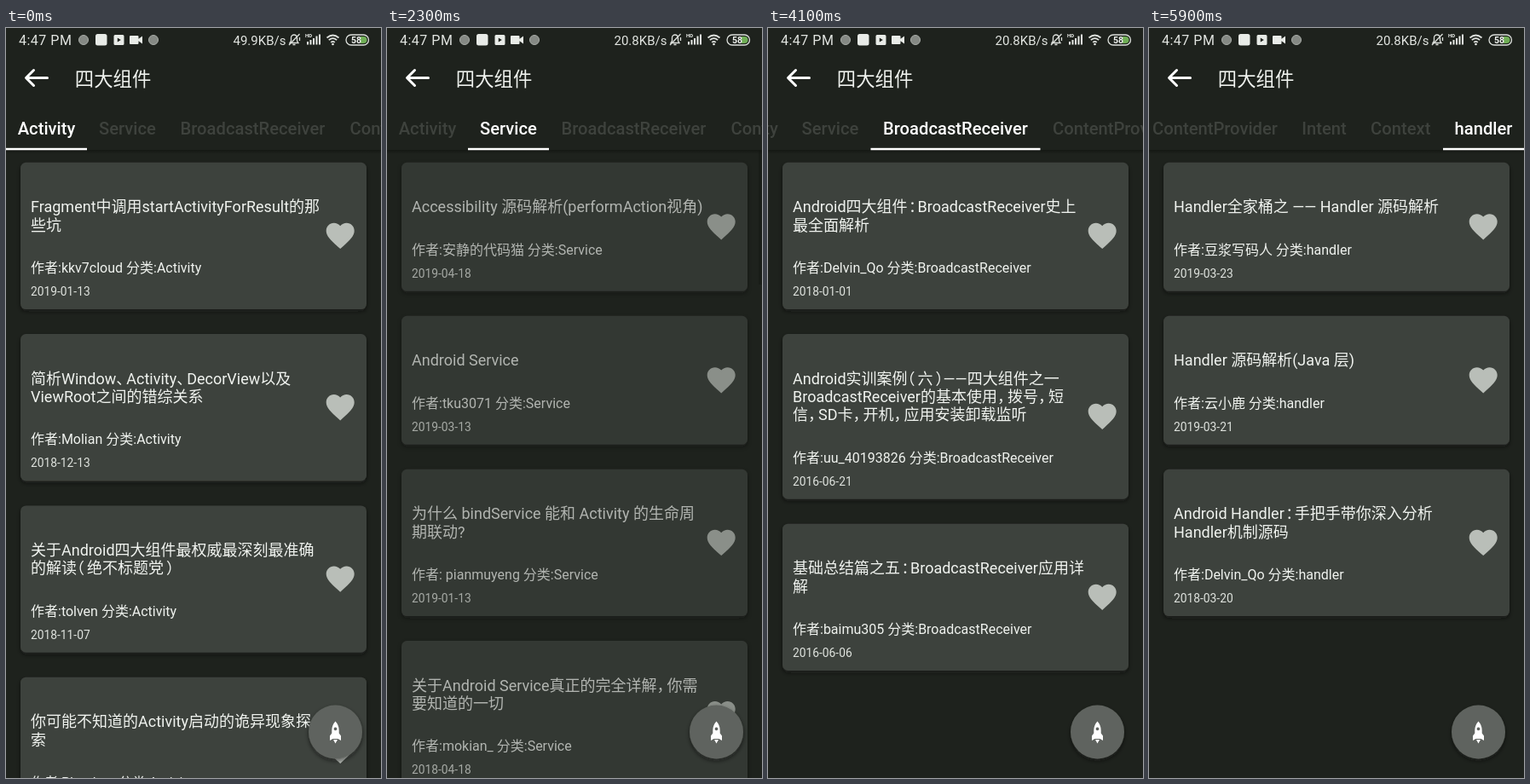
An HTML page for the animation above (6 s loop, 440x880 px).

```html
<!DOCTYPE html>
<html lang="zh-CN">
<head>
<meta charset="utf-8">
<title>四大组件</title>
<style>
html, body { margin: 0; width: 100%; height: 100%; overflow: hidden; background: #1e221d; }
svg { display: block; width: 100vw; height: 100vh; }
text { font-family: Roboto, "Noto Sans CJK SC", "Noto Sans CJK", sans-serif; fill: #f0f3ef; white-space: pre; }
.tab { font-size: 20.2px; font-weight: 500; text-anchor: middle; }
.title { font-size: 18px; }
.author { font-size: 16px; }
.date { font-size: 13.8px; fill: #dfe3de; }
.status { font-size: 15px; fill: #e2e5e1; }
</style>
</head>
<body>
<svg viewBox="0 0 440 880">
  <defs>
    <clipPath id="body"><rect y="144" width="440" height="736"/></clipPath>
    <filter id="shade" x="-10%" y="-10%" width="120%" height="125%">
      <feDropShadow dx="0" dy="2.5" stdDeviation="2.5" flood-color="#0c0f0b" flood-opacity=".6"/>
    </filter>
    <linearGradient id="edge" x2="0" y2="1">
      <stop stop-color="#0e110d" stop-opacity=".6"/>
      <stop offset="1" stop-color="#0e110d" stop-opacity="0"/>
    </linearGradient>
    <path id="heart" fill="#b9beb8" transform="scale(1.65) translate(-12 -12.17)"
      d="M12 21.35l-1.45-1.32C5.4 15.36 2 12.28 2 8.5 2 5.42 4.42 3 7.5 3c1.74 0 3.41.81 4.5 2.09C13.09 3.81 14.76 3 16.5 3 19.58 3 22 5.42 22 8.5c0 3.78-3.4 6.86-8.55 11.54z"/>
  </defs>
  <rect width="440" height="880" fill="#1e221d"/>
  <g id="pages" clip-path="url(#body)"></g>
  <rect y="143" width="440" height="5" fill="url(#edge)"/>

  <g id="tabs"></g>

  <path d="M48.500 58.500H24M32.500 49.500l-9 9 9 9" fill="none" stroke="#fff" stroke-width="3" stroke-linecap="round" stroke-linejoin="round"/>
  <text x="80.800" y="67.500" font-size="22.400">四大组件</text>

  <g id="status" fill="#e8ebe7">
    <text class="status" x="15" y="20" style="font-size:16px;letter-spacing:.5px">4:47 PM</text>
    <circle cx="91" cy="14" r="5.500" fill="#858984" stroke="#a9ada8"/>
    <rect x="105" y="7" width="13.500" height="13.500" rx="2.500"/>
    <path d="M128 8h9q1.500 0 1.500 1.500v9q0 1.500-1.500 1.500h-9q-1.500 0-1.500-1.500v-9q0-1.500 1.500-1.500zM130.800 11.500v5l4-2.500z" fill-rule="evenodd"/>
    <path d="M146 9h8.500q1 0 1 1v2.700l4.500-3.200v9l-4.500-3.200V18q0 1-1 1H146q-1 0-1-1v-8q0-1 1-1z"/>
    <circle cx="173" cy="14" r="5.500" fill="#858984" stroke="#a9ada8"/>
    <text class="status" id="speed" x="266.500" y="19.500"></text>
    <g fill="none" stroke="#dde0dc" stroke-width="1.300">
      <path d="M333 17.500h10l-1.500-2.500v-3.500a3.500 3.500 0 0 0-7 0V15zM336.500 19.500h3M332 20l12.500-13M344.500 11v4"/>
      <path d="M376.500 11.500q7-6 14 0M378.800 14.200q4.700-4 9.400 0M381.200 16.800q2.300-2 4.600 0" stroke-width="1.700"/>
      <rect x="399" y="8" width="26.500" height="12" rx="6"/>
    </g>
    <circle cx="383.500" cy="19" r="1.300"/>
    <text x="351" y="11" style="font-size:6px;font-weight:700">HD</text>
    <path d="M353 16h2v3.500h-2zM356.500 14h2v5.500h-2zM360 12h2v7.500h-2zM363.500 9.500h2v10h-2zM367 7.500h2v12h-2z"/>
    <path d="M416 10h3.500a4 4 0 0 1 0 8H416z" fill="#6fae55"/>
    <text x="411" y="17.800" text-anchor="middle" style="font-size:10.5px;font-weight:700">58</text>
  </g>

  <g filter="url(#shade)"><circle cx="386.500" cy="826" r="31.500" fill="#5f635e"/></g>
  <path fill="#fff" fill-rule="evenodd" d="M386.500 813.500q4.200 4.500 4.200 10.500v3.500l2.300 3v5.500l-3.500-2h-6l-3.500 2v-5.500l2.300-3v-3.500q0-6 4.200-10.500zM386.500 820.500a1.900 1.900 0 1 0 .01 0zM384 835h5l-2.500 4.500z"/>
</svg>
<script>
const LOOP = 6000, W = 440, LAG = 14, FLING = 4250, TAP = 5260;
const NS = 'http://www.w3.org/2000/svg';
const $ = id => document.getElementById(id);

function add(parent, tag, attrs = {}, text) {
  const el = document.createElementNS(NS, tag);
  for (const k in attrs) el.setAttribute(k, attrs[k]);
  if (text) el.textContent = text;
  parent.append(el);
  return el;
}

// Full-width punctuation is set two thirds of an em wide; this is each mark's shift.
const marks = { '、': 0, '，': 0, '：': 1.5, '（': -9, '）': 3 };

function addTitle(parent, y, str) {
  const el = add(parent, 'text', { class: 'title', x: 29, y });
  for (const part of str.split(/([、，：（）])/)) {
    if (!part) continue;
    const dx = marks[part];
    add(el, 'tspan', dx === undefined ? {} : { dx, style: `letter-spacing:${-6 - dx}px` }, part);
  }
}

// Card: title (lines split by |), author, date
const lists = {
  Activity: [
    ['Fragment中调用startActivityForResult的那|些坑', 'kkv7cloud', '2019-01-13'],
    ['简析Window、Activity、DecorView以及|ViewRoot之间的错综关系', 'Molian', '2018-12-13'],
    ['关于Android四大组件最权威最深刻最准确|的解读（绝不标题党）', 'tolven', '2018-11-07'],
    ['你可能不知道的Activity启动的诡异现象探|索', 'Plundeer', '2018-10-16']
  ],
  Service: [
    ['Accessibility 源码解析(performAction视角)', '安静的代码猫', '2019-04-18'],
    ['Android Service', 'tku3071', '2019-03-13'],
    ['为什么 bindService 能和 Activity 的生命周|期联动?', ' pianmuyeng', '2019-01-13'],
    ['关于Android Service真正的完全详解，你需|要知道的一切', 'mokian_', '2018-04-18']
  ],
  BroadcastReceiver: [
    ['Android四大组件：BroadcastReceiver史上|最全面解析', 'Delvin_Qo', '2018-01-01'],
    ['Android实训案例（六）——四大组件之一|BroadcastReceiver的基本使用，拨号，短|信，SD卡，开机，应用安装卸载监听', 'uu_40193826', '2016-06-21'],
    ['基础总结篇之五：BroadcastReceiver应用详|解', 'baimu305', '2016-06-06']
  ],
  ContentProvider: [], Intent: [], Context: [],
  handler: [
    ['Handler全家桶之 —— Handler 源码解析', '豆浆写码人', '2019-03-23'],
    ['Handler 源码解析(Java 层)', '云小鹿', '2019-03-21'],
    ['Android Handler：手把手带你深入分析|Handler机制源码', 'Delvin_Qo', '2018-03-20']
  ]
};
const names = Object.keys(lists);
const edges = [0, 95, 190, 389, 565, 645, 744.5, 839.5];
const maxScroll = edges[7] - W;
const fadeStart = { Service: 2090, BroadcastReceiver: 3650, handler: 5540 };

function addCard(parent, y, kind, [title, author, date]) {
  const lines = title.split('|');
  const h = 151 + 21.3 * (lines.length - 1);
  add(parent, 'rect', { x: 17, y, width: 406, height: h, rx: 6.5, fill: '#3e423d', filter: 'url(#shade)' });
  lines.forEach((s, i) => addTitle(parent, y + 58.5 + 21.3 * i, s));
  const foot = y + h - 43;
  add(parent, 'text', { class: 'author', x: 29, y: foot }, `作者:${author} 分类:${kind}`);
  add(parent, 'text', { class: 'date', x: 29, y: foot + 27 }, date);
  add(add(parent, 'g', { transform: `translate(392.2 ${y + h / 2})` }), 'use', { href: '#heart' });
  return y + h + 29;
}

const pages = names.map((kind, i) => {
  const root = add($('pages'), 'g');
  const cards = add(root, 'g');
  lists[kind].reduce((y, card) => addCard(cards, y, kind, card), 157.8);
  return { root, cards, fade: fadeStart[kind] };
});
// Scrollbar of the Service list
add(pages[1].cards, 'rect', { x: 436, y: 144, width: 4.5, height: 157, fill: '#171b16' });

const labels = names.map((s, i) =>
  add($('tabs'), 'text', { class: 'tab', x: (edges[i] + edges[i + 1]) / 2, y: 124.5 }, s));
const bar = add($('tabs'), 'rect', { y: 140.8, height: 2.5, fill: '#fff' });

const clamp = (v, lo = 0, hi = 1) => Math.min(hi, Math.max(lo, v));
const mix = (a, b, k) => a + (b - a) * k;
const inOut = u => (u = clamp(u), u < .5 ? 4 * u ** 3 : 1 - 4 * (1 - u) ** 3);
const out = u => 1 - (1 - clamp(u)) ** 5;

// Page position: two swipes, then a tap that runs over four pages.
const position = t =>
  inOut((t - 757) / 500) + inOut((t - 2667) / 500) + 4 * out((t - TAP) / 480);

function drawTabs(t) {
  const pos = position(t - LAG);
  const i = Math.min(Math.floor(pos), 5), k = pos - i;
  const left = mix(edges[i], edges[i + 1], k);
  const right = mix(edges[i + 1], edges[i + 2], k);
  let scroll = clamp((left + right - W) / 2, 0, maxScroll);
  if (t >= FLING && t < TAP) scroll = mix(scroll, maxScroll, inOut((t - FLING) / 600));
  $('tabs').setAttribute('transform', `translate(${-scroll} 0)`);
  bar.setAttribute('x', left);
  bar.setAttribute('width', right - left);
  const active = t >= TAP ? 6 : Math.round(pos);
  labels.forEach((el, n) => { el.style.fill = n === active ? '#fff' : '#3e423d'; });
}

function draw(t) {
  const pos = position(t);
  pages.forEach(({ root, cards, fade }, i) => {
    const x = (i - pos) * W;
    root.setAttribute('transform', `translate(${x} 0)`);
    root.style.display = Math.abs(x) < W ? '' : 'none';
    cards.style.opacity = fade ? clamp((t - fade) / 300) : 1;
  });
  drawTabs(t);
  $('speed').textContent = t < 1800 ? '49.9KB/s' : '20.8KB/s';
}

function tick() {
  draw(performance.now() % LOOP);
  requestAnimationFrame(tick);
}
tick();
</script>
</body>
</html>
```
